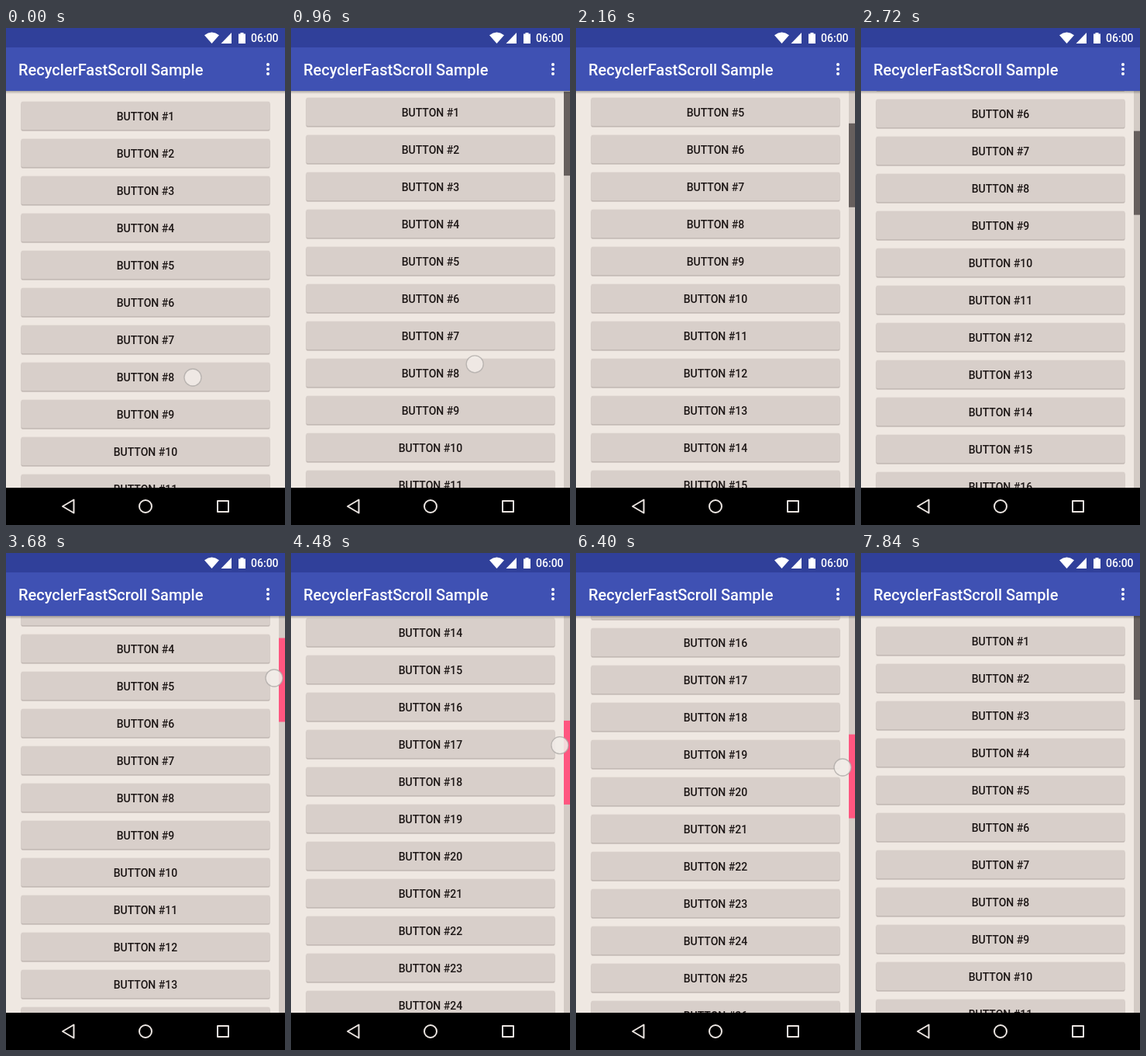
An HTML page that plays this animation: 360 by 640 pixels, repeating every 8000 ms.

```html
<!DOCTYPE html>
<html lang="en">
<head>
<meta charset="utf-8">
<title>RecyclerFastScroll Sample</title>
<style>
  html, body { margin: 0; width: 100%; height: 100%; overflow: hidden; background: #000; }
  svg { display: block; width: 100vw; height: 100vh; }
  text { font-family: Roboto, sans-serif; font-weight: 500; }
  .label { font-size: 14px; fill: #1c1615; text-anchor: middle; }
  .nav { fill: none; stroke: #ece6e2; stroke-width: 2; stroke-linejoin: round; }
</style>
</head>
<body>
<svg viewBox="0 0 360 640">
  <defs>
    <linearGradient id="shade" x2="0" y2="1">
      <stop offset="0" stop-color="#000" stop-opacity=".28"/>
      <stop offset="1" stop-color="#000" stop-opacity="0"/>
    </linearGradient>
    <clipPath id="view"><rect y="81" width="360" height="511"/></clipPath>
  </defs>

  <rect width="360" height="640" fill="#efe8e2"/>
  <g clip-path="url(#view)">
    <g id="list"></g>
    <g id="bar">
      <rect x="352" y="81" width="8" height="511" fill="#d3cbc5"/>
      <rect id="handle" x="352" y="81" width="8" height="108"/>
    </g>
  </g>

  <rect y="81" width="360" height="4" fill="url(#shade)"/>
  <rect width="360" height="25" fill="#30409a"/>
  <rect y="25" width="360" height="56" fill="#3f51b3"/>
  <text x="16" y="61" font-size="20" fill="#fff">RecyclerFastScroll Sample</text>
  <g fill="#fff">
    <circle cx="338" cy="47" r="2"/>
    <circle cx="338" cy="53" r="2"/>
    <circle cx="338" cy="59" r="2"/>
    <path d="M256 9.2Q265.500 1.800 275 9.200L265.500 20Z"/>
    <path d="M277.500 20H291V6Z"/>
    <path d="M300 7.500H302.500V6H306.500V7.500H309V20H300Z"/>
    <text x="316" y="18" font-size="14">06:00</text>
  </g>

  <rect y="592" width="360" height="48" fill="#000"/>
  <g class="nav">
    <path d="M73 616L87.500 607.500V624.500Z"/>
    <circle cx="180" cy="616" r="8"/>
    <rect x="273" y="609" width="14" height="14"/>
  </g>

  <circle id="touch" r="11" fill="#f1ece7" fill-opacity=".88" stroke="#aaa5a3" stroke-opacity=".75" stroke-width="1.300"/>
</svg>
<script>
const LOOP = 8000, STEP = 80, ROW = 48, ROWS = 50;
const HANDLE_RATIO = 0.2125;
const $ = id => document.getElementById(id);

// Each track is a list of [time, value].
const scroll = [[700, 0], [1600, 51], [2000, 165], [2480, 238], [2720, 243], [3120, 243],
  [3680, 134], [4880, 810], [5200, 810], [5360, 828], [5840, 960], [6400, 718], [7360, 0]];
const slide = [[720, 8], [880, 0]];
const touches = [
  { from: 0, to: 2000,
    x: [[480, 241], [1600, 227], [2000, 220]],
    y: [[480, 450], [1600, 373], [2000, 255]] },
  { from: 2960, to: 7600,
    x: [[3120, 346], [3680, 346], [5360, 348], [6400, 344], [7360, 345]],
    y: [[3120, 184], [3680, 161], [4880, 278], [5200, 278], [5360, 288],
      [5840, 314], [6400, 276], [7360, 149]] }
];

// Monotone cubic interpolation: smooth, without overshoot.
function sample(track, t) {
  const last = track.length - 1;
  if (t <= track[0][0]) return track[0][1];
  if (t >= track[last][0]) return track[last][1];
  const i = track.findIndex(p => p[0] > t) - 1;
  const slope = k => (track[k + 1][1] - track[k][1]) / (track[k + 1][0] - track[k][0]);
  const tangent = k => {
    if (k === 0 || k === last) return 0;
    const a = slope(k - 1), b = slope(k);
    return a * b <= 0 ? 0 : 2 * a * b / (a + b);
  };
  const [t0, v0] = track[i], [t1, v1] = track[i + 1];
  const d = t1 - t0, u = (t - t0) / d, w = 1 - u;
  return v0 * w * w * (1 + 2 * u) + v1 * u * u * (3 - 2 * u)
    + d * u * w * (tangent(i) * w - tangent(i + 1) * u);
}

function row(n) {
  const y = 95 + n * ROW;
  const box = (top, height, fill) =>
    `<rect x="19.500" y="${top}" width="321" height="${height}" rx="2" fill="${fill}"/>`;
  return box(y - 0.5, 38.5, '#e0d8d2') + box(y + 1, 36.5, '#c3bab5')
    + box(y, 36, '#d8cfca')
    + `<text class="label" x="180" y="${y + 23.5}">BUTTON #${n + 1}</text>`;
}

function render(time) {
  const t = Math.floor((time % LOOP) / STEP) * STEP;
  const offset = sample(scroll, t);
  $('list').setAttribute('transform', `translate(0 ${-Math.round(offset)})`);
  $('bar').setAttribute('transform', `translate(${sample(slide, t)} 0)`);
  $('handle').setAttribute('y', 81 + offset * HANDLE_RATIO);
  $('handle').setAttribute('fill', t >= 3040 && t < 7600 ? '#ff5680' : '#665f5d');

  const touch = touches.find(p => t >= p.from && t < p.to);
  $('touch').setAttribute('visibility', touch ? 'visible' : 'hidden');
  if (touch) {
    $('touch').setAttribute('cx', sample(touch.x, t));
    $('touch').setAttribute('cy', sample(touch.y, t));
  }
}

$('list').innerHTML = Array.from({ length: ROWS }, (_, n) => row(n)).join('');
const start = performance.now();
function tick() {
  render(performance.now() - start);
  requestAnimationFrame(tick);
}
tick();
</script>
</body>
</html>
```
